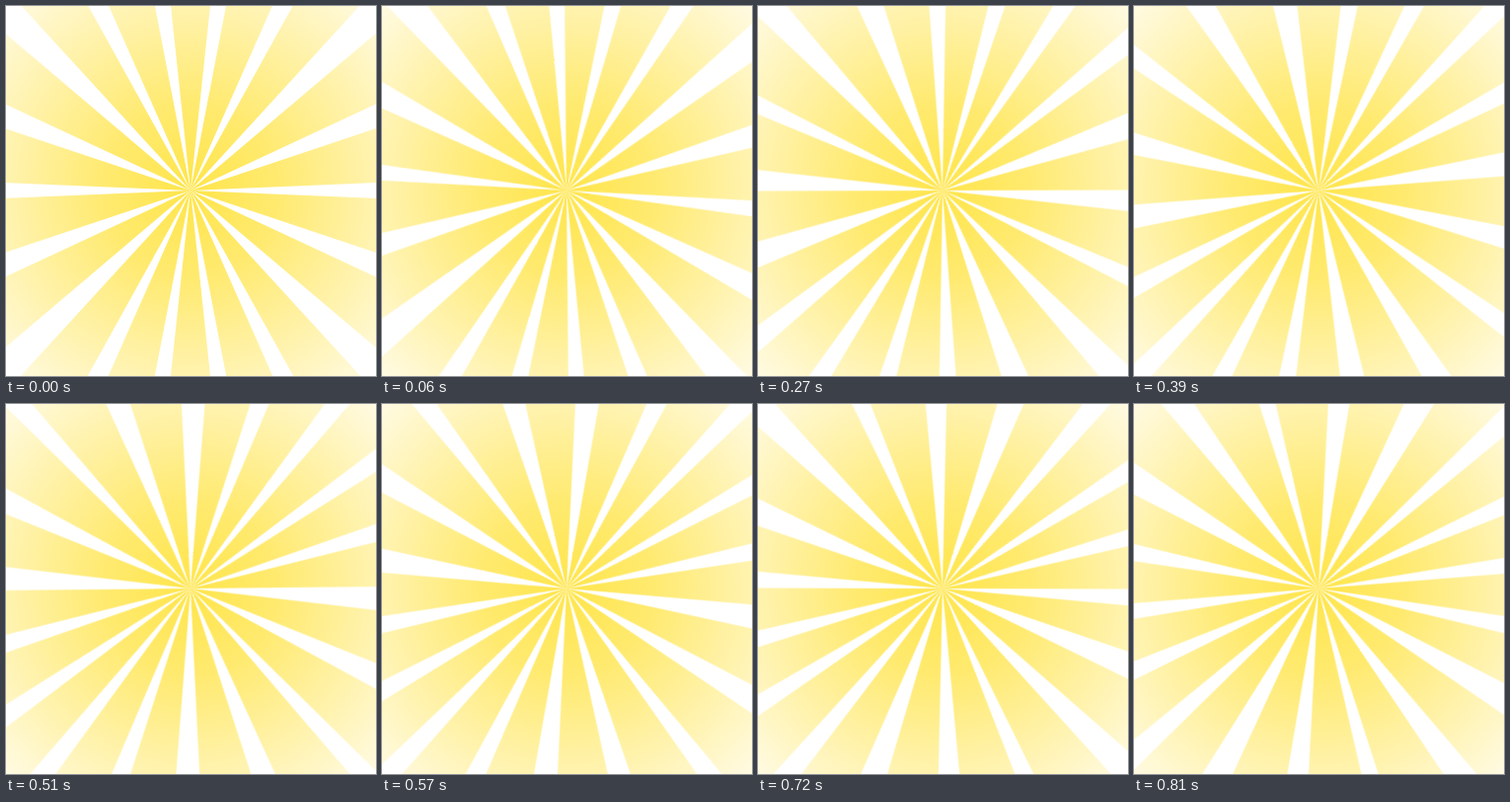
An HTML page for the animation above (0.84 s loop, 375 px wide and 375 px high).

```html
<!DOCTYPE html>
<html lang="en">
<head>
<meta charset="utf-8">
<title>Sunburst</title>
<style>
  html, body {
    margin: 0;
    width: 100%;
    height: 100%;
    overflow: hidden;
    background: #fff;
  }
  svg {
    display: block;
    width: 375px;
    height: 375px;
  }
  #rays {
    transform-origin: 0 0;
    animation: spin 840ms steps(28) infinite;
  }
  @keyframes spin {
    to { transform: rotate(77.3deg); }
  }
</style>
</head>
<body>
<svg viewBox="-187 -187 375 375">
  <defs>
    <radialGradient id="glow" gradientUnits="userSpaceOnUse" cx="0" cy="0" r="270">
      <stop offset="0" stop-color="#ffe54a"/>
      <stop offset=".33" stop-color="#ffea70"/>
      <stop offset=".7" stop-color="#fff3b0"/>
      <stop offset="1" stop-color="#fffbe6"/>
    </radialGradient>
  </defs>
  <path id="rays" fill="url(#glow)"/>
</svg>
<script>
  const RADIUS = 280;

  // Ray edges in degrees clockwise from the top; the sides mirror each other.
  const upright = [-6.1, 6.1];
  const slanted = [[10.9, 23.9], [29, 42.5], [49.7, 65], [71.5, 87.6]];
  const half = [upright, ...slanted, ...slanted.map(([a, b]) => [180 - b, 180 - a])];

  const point = deg => {
    const a = deg * Math.PI / 180;
    return `${(RADIUS * Math.sin(a)).toFixed(2)} ${(-RADIUS * Math.cos(a)).toFixed(2)}`;
  };
  const ray = (a, b) => `M0 0L${point(a)}L${point(b)}Z`;

  const outline = [0, 180].flatMap(turn => half.map(([a, b]) => ray(a + turn, b + turn))).join('');
  document.getElementById('rays').setAttribute('d', outline);
</script>
</body>
</html>
```
